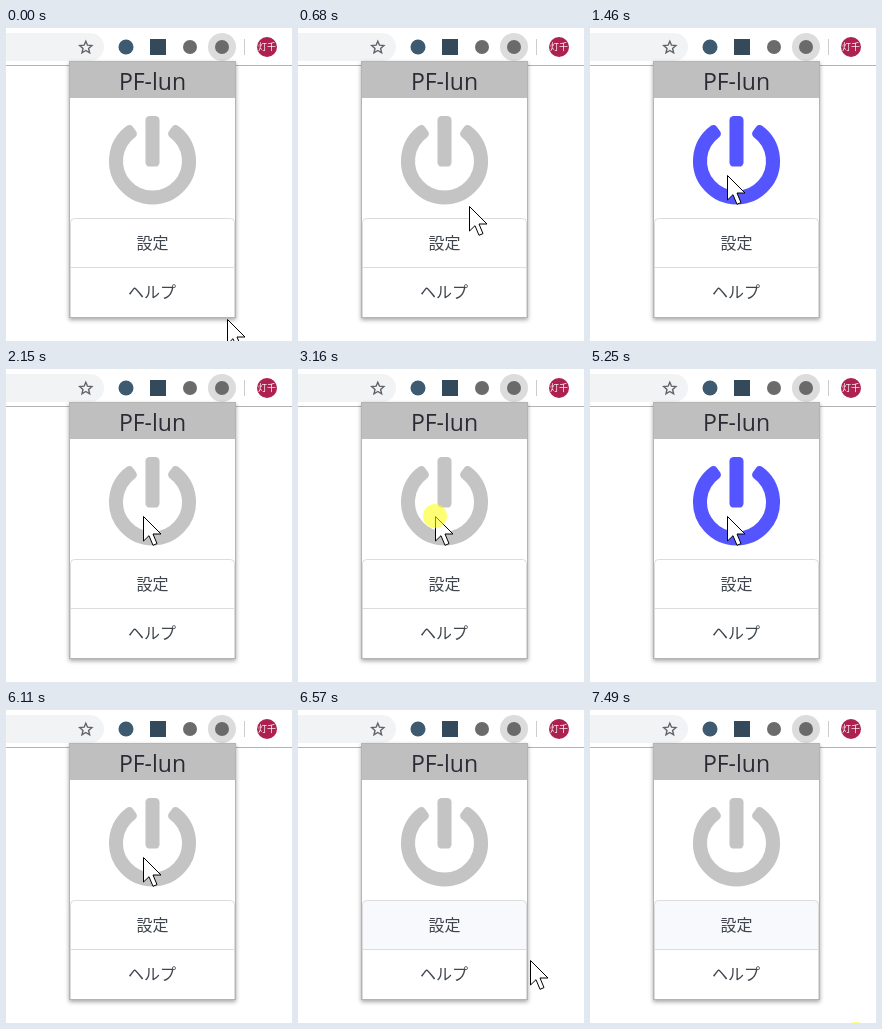
These frames come from a looping animation (286 px wide and 313 px high, 7650 ms). An HTML page:

```html
<!DOCTYPE html>
<html lang="ja">
<head>
<meta charset="utf-8">
<title>Power toggle popup</title>
<style>
  html, body { margin: 0; width: 100%; height: 100%; overflow: hidden; background: #fff; }
  svg { display: block; }
  text { text-anchor: middle; }
  .title { font: 23px "Open Sans", "Noto Sans", sans-serif; fill: #2b2b36; }
  .label { font: 16px "Noto Sans CJK JP", "Noto Sans CJK", sans-serif; fill: #3f454d; }
  .avatar { font: 9px "Noto Sans CJK JP", "Noto Sans CJK", sans-serif; fill: #fff; }
  .panel { filter: drop-shadow(0 2px 2px rgba(0, 0, 0, .35)); }
  .rule { fill: none; stroke: #dcdcdc; }
  #power { color: #c4c4c4; }
  #click { opacity: 0; }
</style>
</head>
<body>
<svg width="286" height="313" viewBox="0 0 286 313">
  <!-- toolbar -->
  <rect x="-20" y="5" width="118" height="28" rx="14" fill="#f1f3f4"/>
  <path d="M0 37.5H286" stroke="#b2b2b2"/>
  <path d="M79.8 13.2l1.7 4 4.4.4-3.3 2.9 1 4.3-3.8-2.3-3.8 2.3 1-4.3-3.3-2.9 4.4-.4z"
        fill="none" stroke="#5f6368" stroke-width="1.4"/>
  <circle cx="120" cy="19" r="7.5" fill="#3d5a70"/>
  <rect x="144" y="11" width="16" height="16" fill="#34495a"/>
  <circle cx="184" cy="19" r="7" fill="#6b6b6b"/>
  <circle cx="216" cy="19" r="14" fill="#dcdcdc"/>
  <circle cx="216" cy="19" r="7" fill="#6a6a6a"/>
  <path d="M238.5 11V27" stroke="#cbcdd1"/>
  <circle cx="261" cy="19" r="10" fill="#ad2150"/>
  <text class="avatar" x="261" y="22.3">灯千</text>

  <!-- popup -->
  <rect class="panel" x="63.5" y="33.5" width="166" height="256" fill="#fff" stroke="#b4b4b4"/>
  <rect x="64" y="34" width="165" height="36" fill="#bfbfbf"/>
  <text class="title" x="146.5" y="62">PF-lun</text>

  <g id="power" transform="translate(146.5 133) scale(.1755)" fill="currentColor">
    <path d="M131.7-181.2A224 224 0 1 1-131.7-181.2L-112.9-155.3A192 192 0 1 0 112.9-155.3Z"
          stroke="currentColor" stroke-width="48" stroke-linejoin="round"/>
    <rect x="-40" y="-256" width="80" height="288" rx="24"/>
  </g>

  <path id="settings" d="M65 239V194a4 4 0 0 1 4-4H224a4 4 0 0 1 4 4V239Z" fill="#fff"/>
  <rect id="help" x="65" y="240" width="163" height="49" fill="#fff"/>
  <path class="rule" d="M64.5 289V194.5a4 4 0 0 1 4-4H224.5a4 4 0 0 1 4 4V289M65 239.5H228"/>
  <text class="label" x="146.5" y="221">設定</text>
  <text class="label" x="146" y="270">ヘルプ</text>

  <!-- pointer -->
  <g id="pointer">
    <path d="M.5.5V25L6 19.7 10 29.3 14 27.6 10 18H18Z" fill="#fff" stroke="#000"/>
    <circle id="click" r="12" fill="rgba(255,255,0,.55)"/>
  </g>
</svg>
<script>
  const LOOP = 7650;

  // time, x, y, hovered item
  const moves = [
    [0, 221, 291],
    [70, 215, 275, "help"],
    [145, 207, 251, "help"],
    [220, 197, 225, "settings"],
    [295, 187, 200, "settings"],
    [370, 178, 183],
    [680, 171, 178],
    [758, 161, 169],
    [835, 150, 158],
    [912, 141, 150],
    [990, 137, 147],
    [6260, 144, 155],
    [6337, 160, 175],
    [6413, 183, 200, "settings"],
    [6490, 208, 224, "settings"],
    [6567, 232, 250, "settings"],
    [6643, 246, 280, "settings"],
    [6720, 253, 310, "settings"],
    [6950, 256, 312, "settings"],
    [7030, 266, 324, "settings"]
  ];

  // press and release times; each release flips the power
  const clicks = [
    [1300, 1460], [2070, 2150], [3160, 3310], [3920, 4090],
    [5170, 5250], [6040, 6110], [7490, LOOP]
  ];

  // Plays [time, value] steps, holding each value until the next one.
  function play(id, prop, steps) {
    const frames = steps.map(([time, value]) =>
      ({ offset: time / LOOP, [prop]: value, easing: "steps(1, end)" }));
    const last = steps[steps.length - 1];
    if (last[0] < LOOP) frames.push({ offset: 1, [prop]: last[1] });
    document.getElementById(id).animate(frames, { duration: LOOP, iterations: Infinity });
  }

  play("pointer", "transform", moves.map(([t, x, y]) => [t, `translate(${x}px, ${y}px)`]));

  for (const id of ["settings", "help"])
    play(id, "fill", moves.map(([t, , , over]) => [t, over === id ? "#f7f9fc" : "#fff"]));

  play("click", "opacity", [[0, 0], ...clicks.flatMap(([down, up]) => [[down, 1], [up, 0]])]);

  const flips = clicks.slice(0, -1).map(([, up], i) => [up, i % 2 ? "#c4c4c4" : "#5555ff"]);
  play("power", "color", [[0, "#c4c4c4"], ...flips]);
</script>
</body>
</html>
```
